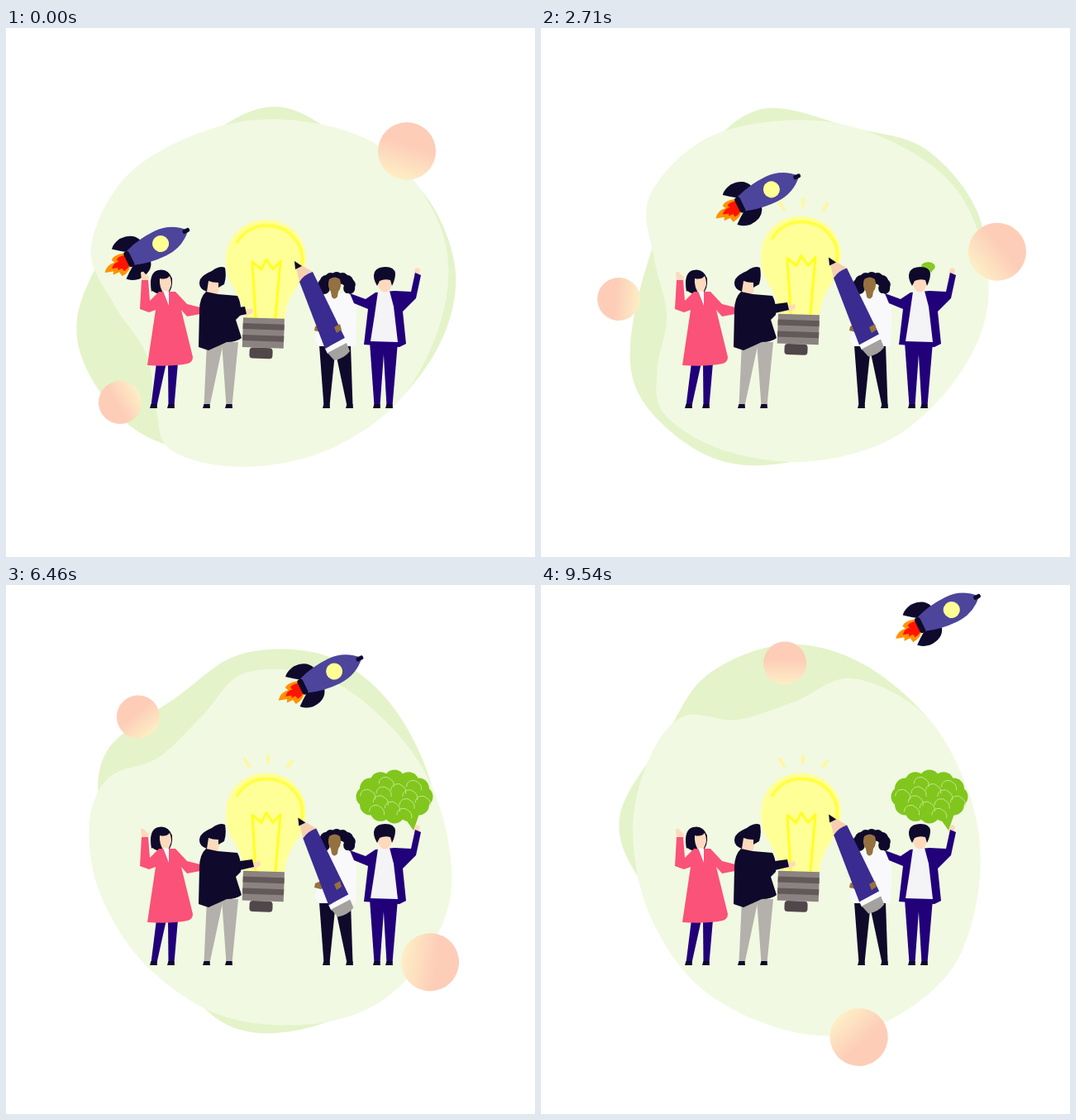
An HTML page that plays this animation: 640 px wide and 640 px high, repeating every 9.58 s.

```html
<!DOCTYPE html>
<html lang="en">
<head>
<meta charset="utf-8">
<title>Launching an idea</title>
<style>
  html, body { margin: 0; width: 100%; height: 100%; overflow: hidden; background: #fff; }
  svg { display: block; width: 100%; height: 100%; }
  .navy { fill: #0f092b; }
  .indigo { fill: #21007a; }
  .skin { fill: #fddabd; }
  .brown { fill: #957140; }
  .pink { fill: #fa5279; }
  .line { fill: none; stroke-linecap: round; stroke-linejoin: round; }
</style>
</head>
<body>
<svg viewBox="0 0 640 640">
  <defs>
    <linearGradient id="warmDown" x1=".6" y1=".2" x2=".36" y2="1">
      <stop offset=".25" stop-color="#fdcdb8"/><stop offset="1" stop-color="#fdf0c6"/>
    </linearGradient>
    <linearGradient id="warmRight" x1=".2" y1=".66" x2=".95" y2=".24">
      <stop offset=".3" stop-color="#fdcdb8"/><stop offset="1" stop-color="#fdf0c6"/>
    </linearGradient>
    <path id="flame" d="M-45-9Q-58-13-62-8L-60-4Q-70-6-76 2L-66 5L-68 9L-60 9L-59 15Q-48 14-45 8Z"/>
    <path id="fin" d="M-20 14Q-24 27-42 27Q-52 25-56 20Q-49 14-40 8Z"/>
  </defs>

  <path id="backBlob" fill="#e4f3c9"/>
  <path id="frontBlob" fill="#f1f9e2"/>

  <g id="balls">
    <circle cx="485" cy="149" r="35" fill="url(#warmDown)"/>
    <circle cx="138" cy="453" r="26" fill="url(#warmRight)"/>
  </g>

  <!-- Rocket pointing right, with its window at the origin -->
  <g id="rocket"><g transform="rotate(-26)">
    <use href="#flame" fill="#ff9200"/>
    <use href="#flame" fill="#ff1400" transform="translate(-13) scale(.7)"/>
    <use href="#fin" class="navy"/>
    <use href="#fin" class="navy" transform="scale(1 -1)"/>
    <path fill="#4c459b" d="M37 0Q22-17 0-17Q-22-17-41-10V9Q-22 16 0 16Q22 16 37 0Z"/>
    <rect class="navy" x="-46" y="-10" width="7" height="20" rx="3"/>
    <rect class="navy" x="30" y="-3" width="9" height="5" rx="2"/>
    <circle r="10" fill="#ffff94"/>
  </g></g>

  <g id="legs"></g>

  <!-- Woman in pink -->
  <path class="skin" d="M164 306L163 296Q166 293 168 297L173 301L172 307Z"/>
  <path class="navy" d="M176 319Q172 296 184 293Q196 290 201 303Q202 315 196 321Q187 325 177 318Z"/>
  <path class="skin" d="M186 303Q194 305 198 300Q202 309 198 316L196 321L198 331L191 322Q185 313 186 303Z"/>
  <path class="pink" d="M164 305H172L174 330L185 319H205L219 334L235 338V346L219 349L212 341L226 398Q226 404 220 406Q199 410 171 408L181 341L173 344L162 340Z"/>
  <path fill="#fff" d="M190 318L197 319V336Z"/>

  <!-- Light bulb with rays -->
  <path id="rays" class="line" stroke="#fff7a0" stroke-width="4" d="M289 211L294 219M317 207V215M346 213L341 220"/>
  <g id="bulb">
    <path fill="#ffff97" d="M288 351Q287 333 276 315Q266 301 266 281C266 253 287 232 314 232C343 232 363 253 363 280Q363 299 350 316Q338 333 337 352Z"/>
    <path class="line" stroke="#ffff45" stroke-width="4" d="M280 259Q292 239 316 239Q345 240 357 268Q360 278 357 290"/>
    <path class="line" stroke="#ffff1f" stroke-width="3" d="M302 350L298 283L309 292L315 280L323 292L332 282L326 350"/>
    <g transform="rotate(2 312 351)">
      <rect fill="#8b8381" x="287" y="351" width="50" height="36"/>
      <path stroke="#625958" stroke-width="50" stroke-dasharray="7" d="M312 358V386"/>
      <rect class="cap" fill="#51464a" x="296" y="387" width="28" height="13" rx="4"/>
    </g>
  </g>

  <!-- Man in the dark sweater -->
  <path class="skin" d="M243 307L257 305Q259 314 256 323L250 324L242 320Z"/>
  <path class="navy" d="M243 319Q231 315 235 304Q239 298 249 294Q258 287 265 290Q267 301 264 310L257 314V308Q250 308 245 306Z"/>
  <path class="navy" d="M242 319L256 322L280 324Q285 333 284 347L278 353L285 375Q279 380 267 380L245 390L233 386L234 342Q234 326 242 319Z"/>
  <g id="reach">
    <path class="skin" d="M286 342L298 339L299 344L292 348H286Z"/>
    <path class="navy" d="M256 337L274 339L289 337L291 346L274 350L257 353Z"/>
  </g>

  <!-- Woman with the pencil -->
  <g id="curls" class="navy"></g>
  <path fill="#f9f9fc" d="M387 322Q397 320 415 321L424 339L423 385H379L374 378L382 337Z"/>
  <path class="brown" d="M391 304Q398 299 404 304Q407 313 402 319L401 325Q397 330 394 325L393 319Q388 313 391 304Z"/>
  <path class="brown" d="M374 361L381 358L388 365L381 368L373 366Z"/>
  <g id="pencil">
    <path fill="#f6cfb1" d="M349 282L371 295L355 307Z"/>
    <path class="navy" d="M349 282L358 288L350 292Z"/>
    <path fill="#3a2b90" d="M355 307Q361 298 371 295L410 375L386 388Z"/>
    <path fill="#fafafa" d="M386 388L410 375L413 382L389 394Z"/>
    <path fill="#a4a19e" d="M389 393L412 381L416 391Q409 400 397 402Z"/>
  </g>
  <path class="brown" d="M397 362L404 358L406 365L400 369Z"/>

  <!-- Brain -->
  <g id="brain" fill="#81c61d">
    <path d="M484 284L493 297L501 274Z"/>
    <ellipse cx="470" cy="257" rx="38" ry="24"/>
  </g>

  <!-- Man in the indigo jacket -->
  <path class="skin" d="M493 299L495 291L499 290L501 293L499 301Z"/>
  <path class="indigo" d="M416 321L435 328L447 320L470 318L490 319L495 296L502 299L496 327L480 343L484 382L476 386L433 383L438 340L421 333Z"/>
  <path fill="#f4f3f5" d="M450 319L464 318L469 337L474 380L441 379Q446 348 450 319Z"/>
  <path class="skin" d="M450 304L466 303Q468 311 464 317Q458 322 453 317Q449 312 450 304Z"/>
  <path class="navy" d="M449 312Q443 302 446 295Q449 289 459 289Q470 289 471 297Q471 304 467 312L465 305Q458 303 452 306Z"/>
</svg>

<script>
const LOOP = 9580;
const part = id => document.getElementById(id);
const place = (id, transform) => part(id).setAttribute('transform', transform);
const clamp = v => Math.max(0, Math.min(1, v));
const smooth = v => { v = clamp(v); return v * v * (3 - 2 * v); };

function add(parent, tag, attributes) {
  const node = document.createElementNS('http://www.w3.org/2000/svg', tag);
  for (const [name, value] of Object.entries(attributes)) node.setAttribute(name, value);
  part(parent).append(node);
}

// Closed Catmull-Rom curve through a few points
function closedCurve(points) {
  const n = points.length, at = i => points[(i + n) % n];
  let d = `M${at(0)}`;
  for (let i = 0; i < n; i++) {
    const [a, b, c, e] = [at(i - 1), at(i), at(i + 1), at(i + 2)];
    const c1 = b.map((v, k) => v + (c[k] - a[k]) / 6);
    const c2 = c.map((v, k) => v - (e[k] - b[k]) / 6);
    d += `C${c1} ${c2} ${c}`;
  }
  return d + 'Z';
}

const backShape = () => closedCurve([
  [86, 352], [122, 452], [200, 506], [340, 516], [437, 483], [518, 395],
  [544, 298], [507, 202], [430, 150], [335, 96], [250, 127], [152, 221]
]);

// The dent on one side deepens as the blob turns
const frontShape = turn => closedCurve([
  [103, 265], [131, 335], [170 - 17 * turn, 395 + 10 * turn], [181 - 32 * turn, 460 + 10 * turn],
  [200, 511], [285, 531], [388, 511], [479, 447], [530, 340],
  [526, 242], [460, 149], [360, 113], [255, 120], [150, 175]
]);

// Two tapered legs with shoes
function legs(hipY, hips, width, feet, fill) {
  hips.forEach((hip, i) => {
    const foot = feet[i];
    add('legs', 'path', { fill, d: `M${hip - width} ${hipY}H${hip + width}L${foot + 3.5} 457H${foot - 3.5}Z` });
    add('legs', 'path', { class: 'navy', d: `M${foot - 3.5} 455H${foot + 3.5}L${foot + 4} 460H${foot - 5}Z` });
  });
}
legs(405, [188, 202], 6, [179, 200], '#21007a');
legs(380, [253, 271], 10, [243, 270], '#b4b0ab');
legs(384, [389, 407], 10, [388, 416], '#0f092b');
legs(380, [449, 465], 9, [449, 464], '#21007a');

for (let i = 0; i < 9; i++) {
  const a = Math.PI * (0.9 + i * 0.15);
  add('curls', 'circle', { cx: 400 + 16 * Math.cos(a), cy: 312 + 10 * Math.sin(a), r: 7 });
}

// Brain lobes around an ellipse, each with a pale fold inside
for (let i = 0; i < 12; i++) {
  const a = i * Math.PI / 6, x = 470 + 34 * Math.cos(a), y = 256 + 20 * Math.sin(a);
  add('brain', 'circle', { cx: x, cy: y, r: 12.5 });
}
for (let i = 0; i < 12; i++) {
  const a = i * Math.PI / 6 + 0.2, reach = i % 2 ? 0.55 : 1;
  const x = 470 + 34 * reach * Math.cos(a), y = 256 + 20 * reach * Math.sin(a);
  add('brain', 'path', { class: 'line', stroke: '#c2e78b', d: `M${x - 8} ${y + 3}a8 8 0 0 1 14-5q5 3 4 9` });
}

part('backBlob').setAttribute('d', backShape());

function draw(t) {
  const s = t / LOOP, turn = smooth(s);
  part('frontBlob').setAttribute('d', frontShape(turn));
  place('frontBlob', `rotate(${90 * turn} 316 326)`);
  place('backBlob', `rotate(${-90 * turn} 307.5 308.5)`);
  place('balls', `rotate(${120.5 * s} 320 319)`);
  place('rocket', `translate(${187 + 311 * s + 52 * s * (1 - s) ** 4} ${261 - 232 * s})`);

  const lift = smooth((t - 1400) / 1000);
  place('bulb', `translate(0 ${-4.5 * lift})`);
  place('reach', `translate(${9 * lift} ${-5 * lift})`);
  part('rays').setAttribute('opacity', clamp((t - 2300) / 400));

  // The pencil bobs down and back in the second half
  const bob = s > 0.5 ? Math.sin(2 * Math.PI * (s - 0.5)) : 0;
  place('pencil', `translate(${6 * bob - lift} ${4.5 * (bob - lift)})`);

  const grow = smooth((t - 2440) / 1000);
  place('brain', `translate(468 296) scale(${grow}) translate(-468 -296)`);
}

function frame(now) {
  draw(now % LOOP);
  requestAnimationFrame(frame);
}
draw(0);
requestAnimationFrame(frame);
</script>
</body>
</html>
```
